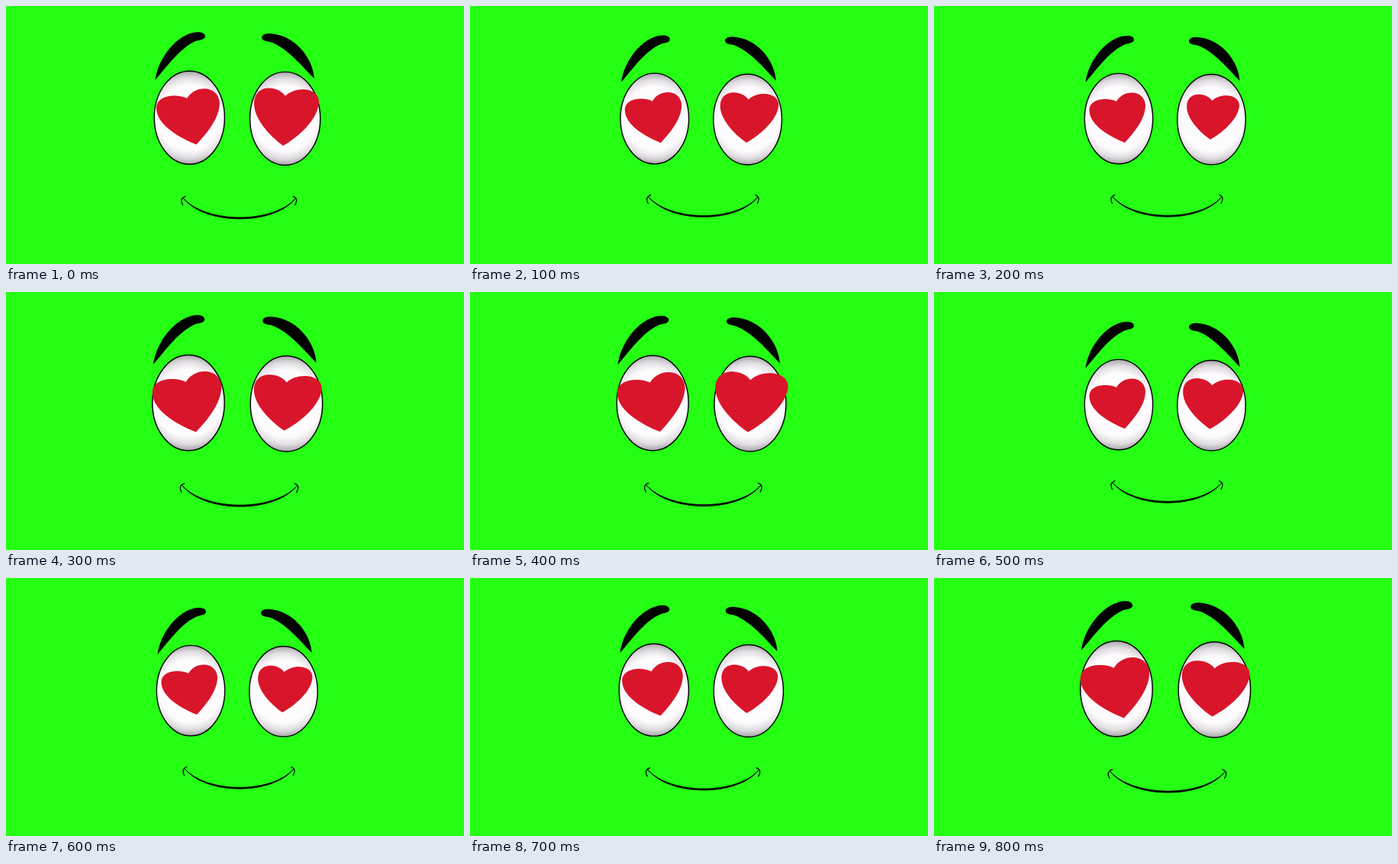
These frames come from a looping animation (600 px wide and 338 px high, 0.9 s). An HTML page with a canvas:

```html
<!DOCTYPE html>
<html lang="en">
<head>
<meta charset="utf-8">
<title>Heart eyes</title>
<style>
html, body { margin: 0; width: 100%; height: 100%; overflow: hidden; background: #24ff14; }
canvas { display: block; }
</style>
</head>
<body>
<canvas id="stage" width="600" height="338"></canvas>
<script>
const ctx = document.getElementById('stage').getContext('2d');
const STEP = 100;

const leftBrow = new Path2D('M198.5 100C201.5 76 220.5 47 245 40C254 37.5 262 39.5 262 44C262 48 257 48.5 251 50C231 58 214 82 198.5 100Z');
const rightBrow = new Path2D('M400.5 98C399.5 75 379.5 46 350 41.5C340 39.5 334 42 334 46C334 50 340 50.5 345 51.5C366 59 384 81 400.5 98Z');
const smile = new Path2D('M234 249.8C262 285 350 285 377 249.8C349 282.5 263 282.5 234 249.8Z');
const dimples = new Path2D('M237 247.5Q229 250 233.5 258.5M373.5 247.5Q381 250 376 258.5');

// Hearts are drawn relative to their bottom tip.
const leftHeart = new Path2D('M-11 -54C-21 -59.5 -47 -59 -46.5 -42C-46 -23 -20 -8 0 0C12 -13 27 -31 27 -49C26 -69 -1 -71 -11 -54Z');
const rightHeart = new Path2D('M3 -65C-6 -79 -37 -82 -38 -56C-38.5 -36 -19 -14 0 0C18 -10 45 -33 47 -56C48 -76 17 -79 3 -65Z');

// swell: size of the face from 0 to 1; heart: tip x, tip y, x scale, y scale
const pose = (swell, ...heart) => ({ swell, heart });
const full = pose(1, 364.5, 181.5, 1.045, 0.97);
const poses = [
  pose(0.55, 363, 183, 1, 1),
  pose(0.05, 362, 179, 0.9, 0.87),
  pose(0, 361.9, 175, 0.81, 0.785),
  full,
  pose(0.9, 364, 183.5, 1.12, 1.05),
  pose(0, 361.5, 179.5, 0.93, 0.88),
  pose(0, 362, 176, 0.84, 0.81),
  pose(0.36, 362.5, 177, 0.87, 0.84),
  full
];

function drawEye(x, y) {
  ctx.save();
  ctx.translate(x, y);
  // The wide gradient keeps the shade at the top and bottom.
  ctx.scale(59, 59.4);
  const shade = ctx.createRadialGradient(0, 0, 0, 0, 0, 1);
  shade.addColorStop(0, '#fff');
  shade.addColorStop(0.7, '#fdfbfd');
  shade.addColorStop(0.86, '#dfdde0');
  shade.addColorStop(1, '#a5a3a6');
  ctx.beginPath();
  ctx.ellipse(0, 0, 45 / 59, 1, 0, 0, Math.PI * 2);
  ctx.fillStyle = shade;
  ctx.fill();
  ctx.restore();
  ctx.lineWidth = 1.4;
  ctx.beginPath();
  ctx.ellipse(x, y, 44.7, 59.2, 0, 0, Math.PI * 2);
  ctx.stroke();
}

function drawHeart(path, x, y, sx, sy) {
  ctx.save();
  ctx.translate(x, y);
  ctx.scale(sx, sy);
  ctx.fillStyle = '#d9152b';
  ctx.fill(path);
  ctx.restore();
}

function drawFace(swell) {
  const size = 1 + 0.057 * swell;
  ctx.save();
  ctx.translate(295, 190);
  ctx.scale(size, size);
  ctx.translate(-295, -190);
  ctx.fillStyle = ctx.strokeStyle = '#000';
  ctx.lineCap = ctx.lineJoin = 'round';
  ctx.fill(leftBrow);
  ctx.fill(rightBrow);
  ctx.fill(smile);
  ctx.lineWidth = 0.8;
  ctx.stroke(smile);
  ctx.lineWidth = 1.2;
  ctx.stroke(dimples);
  drawEye(242, 147.6);
  drawEye(363.5, 148.7);
  ctx.restore();
}

function draw(time) {
  const { swell, heart } = poses[Math.floor(time / STEP) % poses.length];
  ctx.fillStyle = '#24ff14';
  ctx.fillRect(0, 0, 600, 338);
  drawFace(swell);
  drawHeart(leftHeart, 250 - swell, 179 + 4.5 * swell, 1 + 0.23 * swell, 1 + 0.215 * swell);
  drawHeart(rightHeart, ...heart);
}

const start = performance.now();
function tick() {
  draw(performance.now() - start);
  requestAnimationFrame(tick);
}
tick();
</script>
</body>
</html>
```
